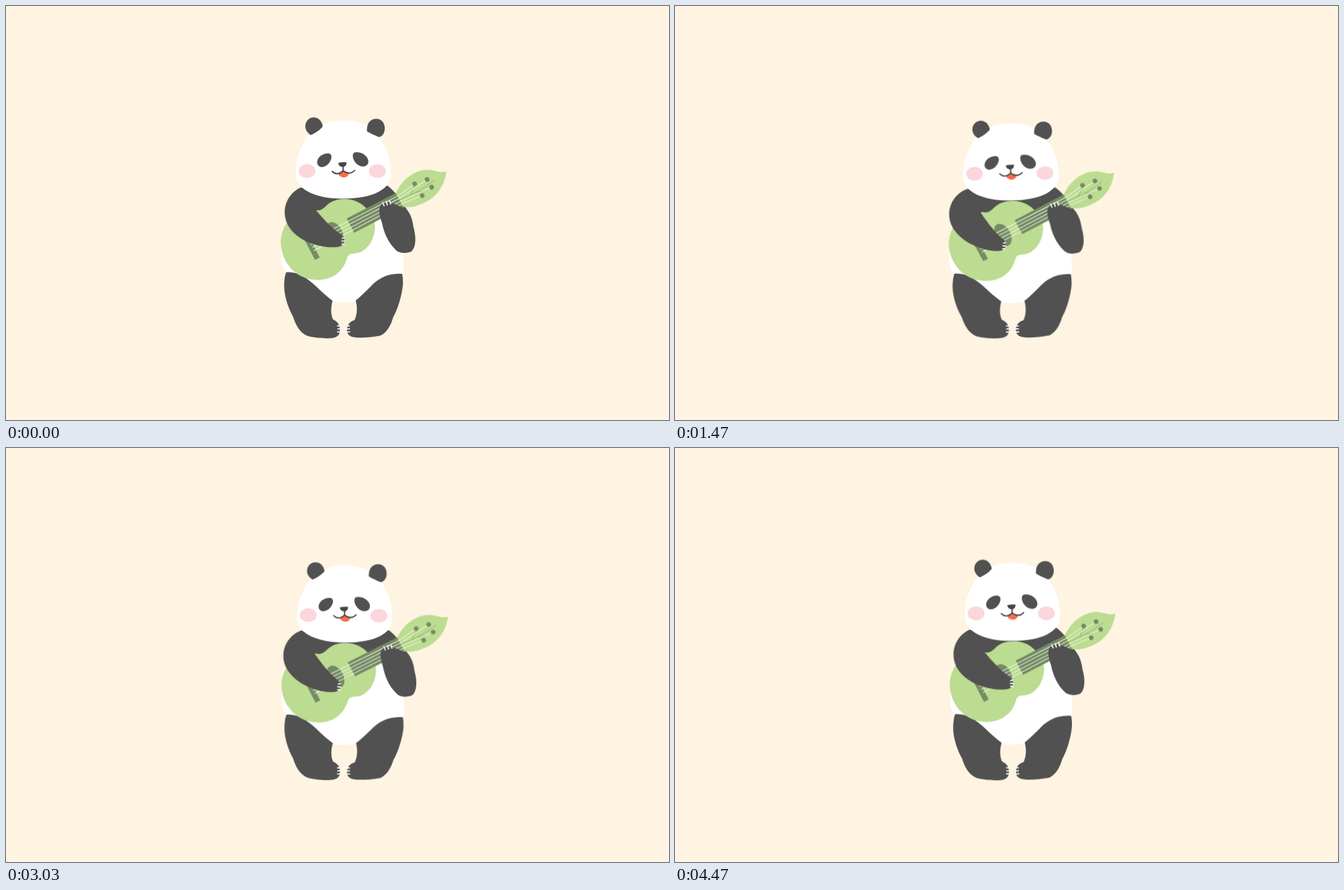
Write an HTML page that moves like this. It is 947x592 px and loops after 4.5 s.

```html
<!DOCTYPE html>
<html lang="en">
<head>
<meta charset="utf-8">
<title>Panda with a leaf guitar</title>
<style>
  html, body { margin: 0; width: 100%; height: 100%; overflow: hidden; background: #fff3e1; }
  svg { display: block; width: 100%; height: 100%; }

  .fur { fill: #515151; }
  .white { fill: #fff; }
  .green { fill: #bbdc91; }
  .wood { fill: #768b65; }
  .pink { fill: #fbd6db; }
  .claws { fill: none; stroke: #fff; stroke-width: 1.7; stroke-linecap: round; }
  .strings { fill: none; stroke: #f1f8e4; stroke-width: .9; }
  .vein { fill: none; stroke: #8cab68; stroke-width: .8; }
  .smile { fill: none; stroke: #454545; stroke-width: 1.8; stroke-linecap: round; }

  .sway, .squash, .strum { transform-box: view-box; }
  .sway { transform-origin: 482px 467px; animation: sway 4.5s linear infinite; }
  .squash { transform-origin: 482px 475px; animation: squash 4.5s infinite; }
  .strum { transform-origin: 436px 256px; animation: strum .9s ease-in-out -.84s infinite; }

  @keyframes sway {
    0%, 10%, 30%, 50%, 70%, 90%, 100% { transform: rotate(0deg); }
    20%, 60% { transform: rotate(1.95deg); }
    40%, 80% { transform: rotate(-1.95deg); }
  }
  @keyframes squash {
    0%, 100% { transform: scale(1, 1); animation-timing-function: cubic-bezier(.3, .36, .65, .85); }
    20%, 40%, 60%, 80% { transform: scale(1, 1.004); animation-timing-function: cubic-bezier(.3, .36, .65, .85); }
    10%, 30%, 50%, 70%, 90% { transform: scale(1.003, .982); animation-timing-function: cubic-bezier(.35, .15, .7, .64); }
  }
  @keyframes strum {
    0%, 100% { transform: rotate(0deg); }
    50% { transform: rotate(7.5deg); }
  }
</style>
</head>
<body>
<svg viewBox="0 0 947 592" preserveAspectRatio="none">
  <g class="sway"><g class="squash">

    <!-- body and shoulders -->
    <path class="white" d="M420 262C405 290 391 335 393 363C394 384 412 395 425 405C440 416 455 424 484 424C510 424 540 405 567 384C569 350 565 300 548 262Z"/>
    <path class="fur" d="M421 260L545 257C556 265 566 280 575 295L540 300C510 294 470 292 436 293Z"/>

    <!-- legs -->
    <path class="fur" d="M400 380.7C416 379 430 389 442 400C450 408 458 415 466.5 421.5C464 430 463.5 440 467 448C473 451 477 455 477 463C477 471 473 475.2 459 475.2C447 475.2 437 473.5 430 471.5C420 467 414 457 410 444C402 430 396 410 397.5 394Q398 386 400 380.7Z"/>
    <path class="fur" d="M566 383C545 381 530 391 521 401C513 409 506 416 499.5 421C502 430 502 440 498 449C491 451 487 456 487 463C487 471 492 474.2 505 474.2C515 474.2 525 473 535 471.2C544 467 550 456 553 445C560 433 566 412 567 397Q567 389 566 383Z"/>
    <path class="claws" d="M473.5 457.3h3.5M474 461.6h4M473.5 466h4M487 457.3h3.5M486.5 461.6h4M487 466h4"/>

    <!-- guitar -->
    <path class="green" d="M441 291.5Q448 294 455 288C463 279 472 276 484 276C499 276 510 283 517 292C524 300 528 309 527 319C525 336 517 347 506 352C499 355 491 352 488 358C484 372 478 380 468 386C456 392.5 443 393 430 389.5C408 383 393 362 392.5 338C393 318 403 305 414 299Z"/>
    <g transform="translate(492 314) rotate(-27.5)">
      <ellipse class="wood" cx="-25" cy="-.5" rx="11" ry="17.3"/>
      <path class="wood" d="M-67.5-18h7.5v38h-7.5zM0-11.5h82v23H0z"/>
    </g>
    <path class="green" d="M557 268C562 254 576 240 592 235.5C603 232.5 614 236 620 237.5Q625 237.5 629 236.5C627 251 621 265 608 275C597 283 580 290 567 287Z"/>
    <path class="vein" d="M562 277Q588 268 612 249M578 270L584 257M586 266L597 265"/>
    <g transform="translate(492 314) rotate(-27.5)">
      <path class="strings" d="M-63-7.5L80-6.5L109-10.7M-63-2.5L80-2.3L128-8M-63 2.5L80 2.3L128 4.8M-63 7.5L80 6.5L111 9.2"/>
      <g class="wood">
        <circle cx="109" cy="-10.7" r="3.3"/>
        <circle cx="127.6" cy="-8" r="3.3"/>
        <circle cx="128.3" cy="4.8" r="3.3"/>
        <circle cx="110.8" cy="9.2" r="3.3"/>
      </g>
    </g>

    <!-- fretting arm -->
    <path class="fur" d="M537 283C545 278 556 283 566 288C576 289 581 306 582 316C586 330 586 345 579 351C570 355 560 353 556 348C546 338 540 325 537 310C533 298 531 288 537 283Z"/>
    <path class="claws" d="M540 285.5L538 281M544.7 284.3L543 279.5M549.5 283L548 278.5"/>

    <!-- strumming arm -->
    <g class="strum">
      <path class="fur" d="M421 259.5C407 266 398 280 398.3 296C398.8 314 411 327 427 335.5C444 343.5 462 346.5 476 344C485 342 486 333 480 327C468 320 455 306 443 292C440 285 438 275 436 268Z"/>
      <path class="claws" d="M480.3 332L483.5 331M480 336h4M480.3 340L483.5 340.8"/>
    </g>

    <!-- head -->
    <path class="white" d="M482 163.5C509 163.5 524 173 533 187C545 203 550 222 550 240C550 262 524 275.5 481 275.5C438 275.5 413.5 260 413.5 240C413.5 220 420 202 430 187C440 172 457 163.5 482 163.5Z"/>
    <path class="fur" d="M452.5 172C451 164 446 159.2 439.5 159.2C432.5 159.2 427.5 165 427.5 172C427.5 177 431 182 435.5 184.5C441 182 448 178 452.5 172Z"/>
    <path class="fur" d="M515.5 179C515 168 520 161.2 529 161.2C537 161.2 541 168 541 175C541 181 538 186 533 187.5C527 185 520 182 515.5 179Z"/>
    <path class="fur" d="M462 211C466 212 466 219 461 225C457 230 450 232 446.5 228.5C443 225 444 219 449 214.5C453 211.5 458 210 462 211Z"/>
    <path class="fur" d="M497.5 209.5C503 207.5 512 210.5 516 217C519.5 223 517 228.5 511 229.5C504 230 498 224.5 496 218C495 214 495 211 497.5 209.5Z"/>
    <ellipse class="pink" cx="430" cy="236" rx="12" ry="10"/>
    <ellipse class="pink" cx="530.5" cy="236" rx="12" ry="9.8"/>
    <path fill="#f66b4f" d="M474.5 239.5Q479 239 481.5 236Q485 239.5 490.5 238.8Q488 245 482.5 245.2Q476 244.5 474.5 239.5Z"/>
    <path class="smile" d="M481.5 229V235.5M466 236.5Q473 243.5 481.5 235.5Q491 242.5 498 235"/>
    <path fill="#454545" d="M474.5 224.5Q480 222.8 486.5 223.5Q486.5 229.5 481.5 230.3Q475.5 230 474.5 224.5Z"/>

  </g></g>
</svg>
</body>
</html>
```
